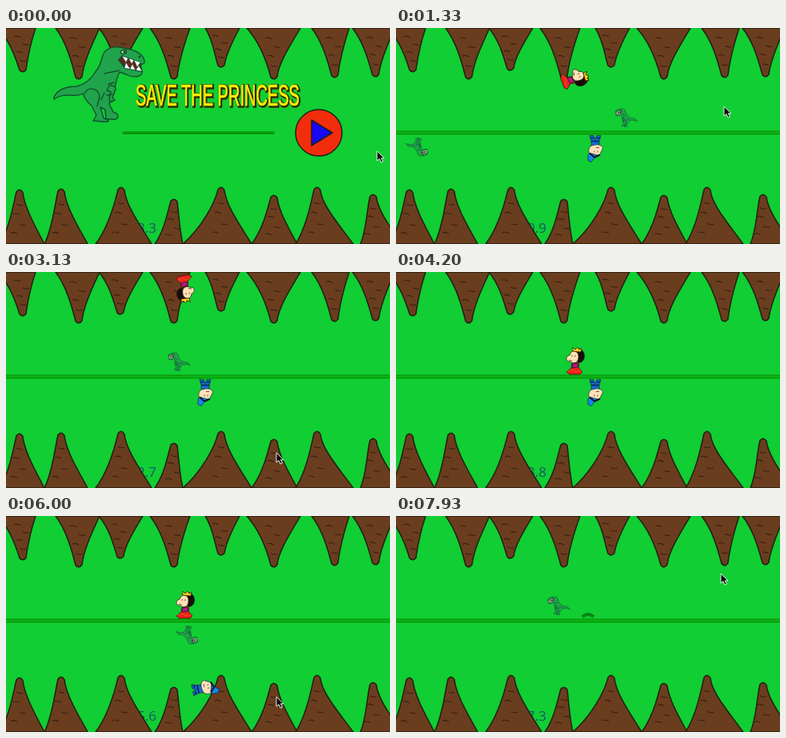
Write an HTML page that moves like this. It is 480 by 270 pixels and loops after 8 s.

```html
<!DOCTYPE html>
<html lang="en">
<head>
<meta charset="utf-8">
<title>Save the Princess</title>
<style>
  html, body { margin: 0; width: 100%; height: 100%; overflow: hidden; background: #10ce33; }
  svg { display: block; width: 100vw; height: 100vh; }
  .ink { stroke: #20200f; stroke-width: 1.5; stroke-linejoin: round; stroke-linecap: round; }
  .title { font: 20px "Liberation Sans", Arial, sans-serif; }
  .timer { font: 17px "Open Sans", "Noto Sans", sans-serif; fill: #17566b; }
</style>
</head>
<body>
<svg viewBox="0 0 480 270">
  <defs>
    <g id="dino" stroke="#12502c" stroke-linejoin="round" stroke-linecap="round">
      <path fill="#20a34c" d="M-56 16C-50 5-38 3-28 3C-16 0-8-8-3-17C4-25 2-32 7-40C14-48 27-47 34-44
        C45-43 56-37 57-29C58-24 52-24 49-26L29-35L25-30L33-20L54-16C56-9 43-7 34-12L26-15
        C22-8 21-1 20 7C19 16 14 20 13 25L18 35C25 37 26 42 21 44L9 44L8 32L2 29L6 43C15 45 14 48 4 47
        L-7 46L-3 39L-9 27C-15 23-18 17-20 12C-30 18-42 9-56 19Z"/>
      <path fill="#632519" d="M29-35L52-26L54-16L33-20L25-30Z"/>
      <path fill="#fff" stroke-width=".6" d="M29-35L34-27L37-33L41-25L44-30L48-21L52-27Z
        M32-20L34-27L39-19L42-25L46-17L50-23L54-16Z"/>
      <path fill="#20a34c" d="M13 2C18 0 23 5 20 9L17 17L20 20L14 23L13 17L15 10L10 8Z"/>
      <path fill="none" d="M-18 12C-13 2 0 5 1 16L-2 28M7-13C14-15 19-15 25-17M7 11L3 20M19-2L12 0M17 13L10 14"/>
      <ellipse cx="31" cy="-40" rx="3.5" ry="2.5" fill="#d8e5b0"/>
      <circle cx="32" cy="-40" r="1" fill="#111"/>
      <circle cx="51" cy="-34" r=".8" fill="#143d20"/>
    </g>
  </defs>

  <rect width="480" height="270" fill="#10ce33"/>
  <text id="timer" class="timer" x="164" y="256">3.3</text>
  <g id="spikes"></g>

  <g id="menu">
    <rect x="145" y="129" width="191" height="4" rx="2" fill="#08a40c"/>
    <path d="M147 131.5H334" stroke="#078507"/>
    <use href="#dino" x="116" y="70" stroke-width="1.4"/>
    <g class="title" transform="translate(162 97) scale(1 1.85)">
      <text x="1.2" y=".7" fill="#342900" stroke="#342900" stroke-width="2">SAVE THE PRINCESS</text>
      <text fill="#fff000" stroke="#fff000" stroke-width=".4">SAVE THE PRINCESS</text>
    </g>
    <circle cx="391" cy="131" r="29" fill="#f22d0c" class="ink"/>
    <path d="M382 115L408 131L382 147Z" fill="#1708f5" class="ink"/>
  </g>

  <g id="game">
    <rect y="128.5" width="480" height="5" fill="#0bb315"/>
    <path d="M0 129H480M0 132.5H480" stroke="#099009"/>
    <g id="dinos"></g>
    <g id="princess" stroke="#241914" stroke-width=".7">
      <path d="M-2-11C-1-17 9-17 11-9C13-3 9 3 4 2L-1-2Z" fill="#170d0b"/>
      <path d="M-4 3L5 2L4 8L9 14L6 17L-7 17L-11 14L-5 9Z" fill="#f21f1f"/>
      <path d="M-4 4L3 3L4 8L-4 9Z" fill="#b51687"/>
      <path d="M-10 13L-3 11L1 14L7 12" stroke="#d9780b" fill="none"/>
      <path d="M-5-11C0-14 5-10 4-4C4 3-3 4-6 1C-13 1-12-6-7-7Z" fill="#ffe1b5"/>
      <path d="M-3-12L-3-17L0-14L3-17L5-14L8-16L7-11Z" fill="#ffd416"/>
      <path d="M-4-7V-5M0-7V-5M-8-1L-4 0" fill="none"/>
    </g>
    <g id="prince" stroke="#14233d" stroke-width=".7">
      <path d="M-5 3L5 3L5 9L7 16L2 16L0 11L-2 16L-7 16L-5 9Z" fill="#126fd0"/>
      <path d="M-5 9H5M-6 13H-2M2 13H6" stroke="#101d52" stroke-width="1.6"/>
      <path d="M-6-7C-2-13 5-12 7-7C10-2 7 4 2 4C-4 6-11 3-9-1Z" fill="#ffe1b5"/>
      <path d="M-5-9L1-12L5-17L9-15L9-8L6-6Z" fill="#1688e8"/>
      <path d="M-6-8L1-11L7-6" stroke="#111831" stroke-width="2" fill="none"/>
      <path d="M-3-5V-3M1-5V-3M-5 1L-1 1" fill="none"/>
    </g>
  </g>

  <g id="banner" fill="none">
    <path d="M-7 2Q0-4 7 2" stroke="#087a10" stroke-width="4"/>
    <path d="M-6 2Q0-3 6 2" stroke="#13a81c" stroke-width="1" stroke-dasharray="1.5 1"/>
  </g>
  <path id="cursor" d="M0 0V12L3 9.5L5 14L7.4 13L5.3 8.8H9Z" fill="#080808" stroke="#fff" stroke-width=".9"/>
</svg>

<script>
const LOOP = 8000, START = 430, HIT = 7760;
const $ = id => document.getElementById(id);
const show = (el, on) => el.setAttribute('visibility', on ? 'inherit' : 'hidden');
const place = (el, x, y, more = '') => el.setAttribute('transform', `translate(${x} ${y}) ${more}`);

// left, right, tip x, tip y
const ceiling = [[-10,37,21,55], [62,117,91,64], [116,171,143,53], [180,230,210,64],
  [249,292,269,49], [301,368,335,64], [382,429,411,62], [433,486,462,61]];
const floor = [[-8,48,17,202], [48,102,69,201], [112,182,144,199], [186,221,210,214],
  [221,307,269,199], [307,364,335,209], [362,434,389,199], [443,494,459,208]];

function spike([left, right, tx, ty], base) {
  const h = ty - base, at = f => base + h * f;
  const edge = `M${left} ${base}C${left + (tx - left) * .5} ${at(.3)} ${tx - 8} ${at(.72)} ${tx - 4} ${at(.96)}
    Q${tx} ${at(1.04)} ${tx + 4} ${at(.95)}C${tx + 6} ${at(.68)} ${right - (right - tx) * .4} ${at(.35)} ${right} ${base}Z`;
  const marks = [[.2, -7], [.36, 4], [.55, -4], [.73, 0]].map(([f, dx], i) =>
    `M${tx + dx - 4} ${at(f)}q4 ${i % 2 ? 2 : -2} 8 1`).join('');
  return `<path class="ink" fill="#6b3d1f" d="${edge}"/><path d="${marks}" fill="none" stroke="#352010" stroke-width="1.1"/>`;
}
$('spikes').innerHTML = ceiling.map(s => spike(s, 0)).join('') + floor.map(s => spike(s, 270)).join('');

// upper runners go left, lower ones go right: a known time and place, and px per ms
const runners = [
  { time: 1330, x: 288, speed: -.218 },
  { time: 2330, x: 402, speed: -.232 },
  { time: 6870, x: 476, speed: -.257 },
  { time: 1330, x: 26, speed: .266 },
  { time: 6000, x: 226, speed: .286 }
];
const small = .24;
for (const r of runners) {
  r.el = document.createElementNS('http://www.w3.org/2000/svg', 'use');
  r.el.setAttribute('href', '#dino');
  r.el.setAttribute('stroke-width', 2.4);
  $('dinos').append(r.el);
}

const JUMP = 800, HEIGHT = 100;
const princessJumps = [1220, 2860], princeJumps = [1751, 5840];

// The flip finishes on the way down, before landing.
function jump(starts, t) {
  const start = starts.find(s => t >= s && t < s + JUMP);
  if (start === undefined) return { rise: 0, turn: 0 };
  const u = (t - start) / JUMP;
  return { rise: HEIGHT * 4 * u * (1 - u), turn: 360 * Math.min(1, u / .72) };
}

const pointer = [[0,464,154], [380,394,134], [500,394,134], [930,430,108], [1330,410,98], [1800,408,100],
  [2330,339,219], [2500,338,226], [6130,338,226], [6600,352,49], [6870,357,65], [7300,396,4],
  [7800,404,30], [7930,406,72], [8000,406,74]];

function along(steps, t) {
  const i = Math.max(1, steps.findIndex(s => s[0] > t));
  const [t0, x0, y0] = steps[i - 1], [t1, x1, y1] = steps[i];
  const k = (t - t0) / (t1 - t0);
  return [x0 + (x1 - x0) * k, y0 + (y1 - y0) * k];
}

function draw(t) {
  const playing = t >= START, alive = playing && t < HIT;
  show($('menu'), !playing);
  show($('game'), playing);
  show($('princess'), alive);
  show($('prince'), alive);
  $('timer').textContent = playing ? ((Math.min(t, HIT) - START) / 1000).toFixed(1) : '3.3';

  const up = jump(princessJumps, t), down = jump(princeJumps, t);
  place($('princess'), 224, 111 - up.rise, `rotate(${up.turn})`);
  place($('prince'), 249, 150.5 + down.rise, `rotate(${180 - down.turn})`);

  for (const { el, time, x, speed } of runners) {
    const now = x + (t - time) * speed, upper = speed < 0;
    show(el, now > -16 && now < 496);
    place(el, now, upper ? 112 : 149, upper ? `scale(${-small} ${small})` : `scale(${small} ${-small})`);
  }

  show($('banner'), t >= 7900);
  place($('banner'), 240, 124, `scale(${1 + Math.max(0, t - 7930) / 70})`);
  show($('cursor'), t < 3600 || t >= 5900);
  place($('cursor'), ...along(pointer, t));
}

const began = performance.now();
function tick() {
  draw((performance.now() - began) % LOOP);
  requestAnimationFrame(tick);
}
tick();
</script>
</body>
</html>
```
